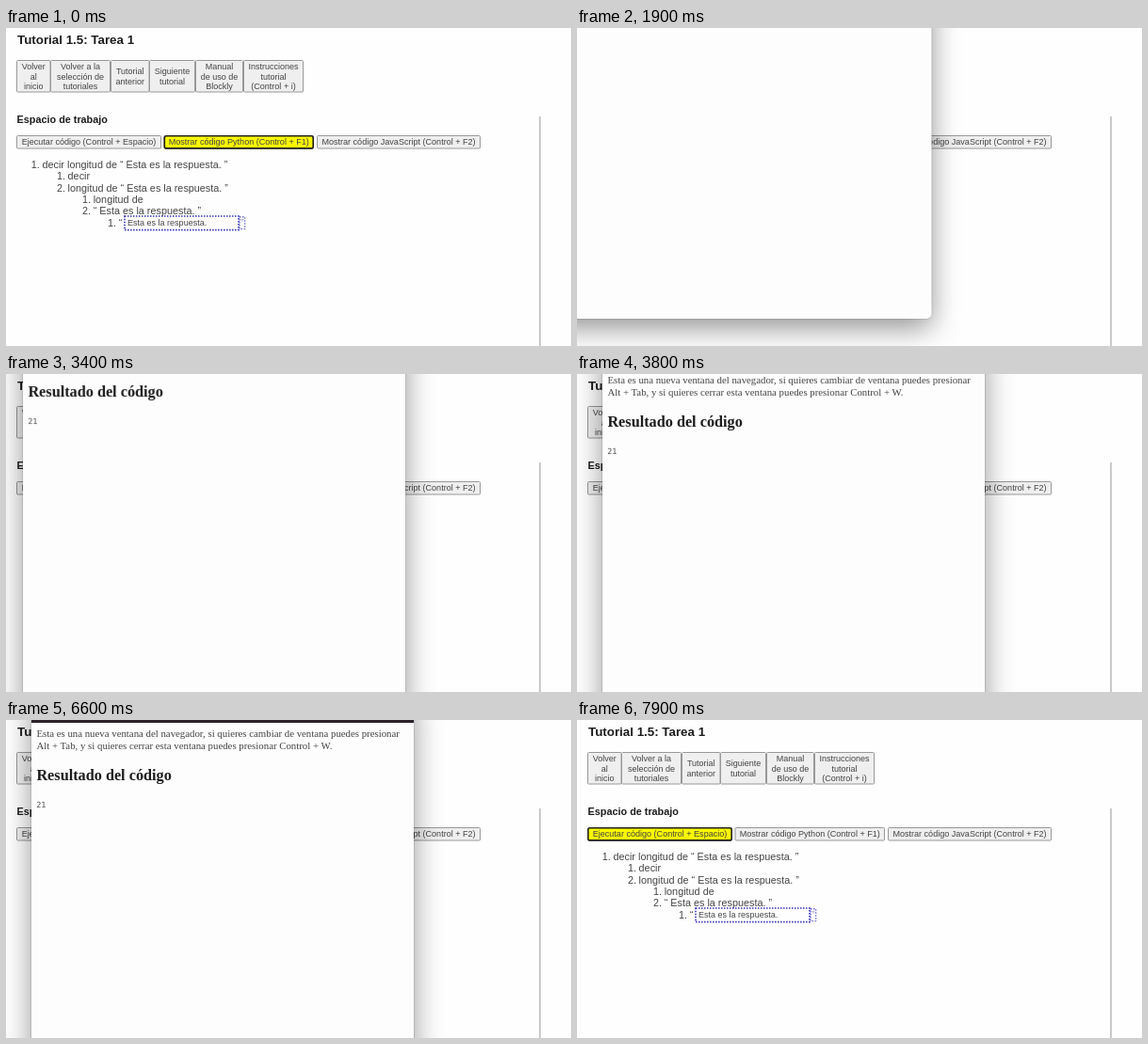
Recreate the animation shown at these times as an HTML page. Size 600 px wide and 338 px high, loop 8000 ms.

```html
<!DOCTYPE html>
<html lang="es">
<head>
<meta charset="utf-8">
<title>Tutorial</title>
<style>
  html, body { margin: 0; width: 100%; height: 100%; overflow: hidden; background: #fefefe; }
  #stage { position: relative; width: 600px; height: 338px; overflow: hidden; background: #fefefe; }
  svg { position: absolute; left: 0; top: 0; overflow: visible; }
  text { white-space: pre; }
  .sans { font-family: "Liberation Sans", Arial, sans-serif; fill: #444; }
  .bold { font-family: "Liberation Sans", Arial, sans-serif; font-weight: bold; fill: #1c1c1c; }
  .serif { font-family: "Liberation Serif", "Times New Roman", serif; fill: #444; }
  .head { font-family: "Liberation Serif", "Times New Roman", serif; font-weight: bold; fill: #1c1c1c; }
  .mono { font-family: "DejaVu Sans Mono", monospace; fill: #505050; }
  #win {
    position: absolute; left: 27px; top: -27px; width: 406px; height: 436px;
    border-radius: 5px; background: #fdfdfe; opacity: 0;
    box-shadow: 0 0 0 .5px rgba(0, 0, 0, .2), 0 10px 30px rgba(0, 0, 0, .42);
  }
  #bar { height: 30px; border-radius: 5px 5px 0 0; background: #2b2229; }
</style>
</head>
<body>
<div id="stage">
  <svg id="page" width="600" height="338"></svg>
  <div id="win"><div id="bar"></div><svg id="doc" width="406" height="436"></svg></div>
</div>
<script>
const LOOP = 8000;
const $ = id => document.getElementById(id);
const page = $('page'), doc = $('doc');

function add(parent, tag, attrs, content) {
  const el = document.createElementNS('http://www.w3.org/2000/svg', tag);
  for (const k in attrs) el.setAttribute(k, attrs[k]);
  if (content) el.textContent = content;
  return parent.appendChild(el);
}
const text = (parent, cls, size, x, y, content, anchor = 'start') =>
  add(parent, 'text', { class: cls, 'font-size': size, x, y, 'text-anchor': anchor }, content);
const box = (x, y, width, height, attrs) =>
  add(page, 'rect', { x, y, width, height, ...attrs });

const plain = { fill: '#efefef', stroke: '#989898', rx: 1 };
const focused = { fill: '#f9f900', stroke: '#222218', 'stroke-width': 1.6, rx: 2 };

text(page, 'bold', 13.35, 12, 17.3, 'Tutorial 1.5: Tarea 1');
text(page, 'bold', 10.83, 11.6, 100.8, 'Espacio de trabajo');

// Navigation: left, right, lines
[
  [11.5, 47, 'Volver|al|inicio'],
  [47.5, 110.5, 'Volver a la|selección de|tutoriales'],
  [111.5, 152, 'Tutorial|anterior'],
  [152.5, 200.5, 'Siguiente|tutorial'],
  [201.5, 251.5, 'Manual|de uso de|Blockly'],
  [252.5, 315.5, 'Instrucciones|tutorial|(Control + i)']
].forEach(([l, r, label]) => {
  box(l, 34.5, r - l, 33.5, plain);
  const lines = label.split('|');
  lines.forEach((s, i) =>
    text(page, 'sans', 9.03, (l + r) / 2, 54.5 + (i - (lines.length - 1) / 2) * 10.2, s, 'middle'));
});

// Actions: left, width, label
const marks = [
  [11.5, 153, 'Ejecutar código (Control + Espacio)'],
  [168, 158.5, 'Mostrar código Python (Control + F1)'],
  [330.5, 173, 'Mostrar código JavaScript (Control + F2)']
].map(([x, w, label]) => {
  box(x, 114.5, w, 13.5, plain);
  const mark = box(x + .3, 114.7, w - .6, 13.2, { ...focused, opacity: 0 });
  text(page, 'sans', 9.05, x + w / 2, 124.4, label, 'middle');
  return mark;
});

// Block outline: depth, number, label
[
  [0, 1, 'decir longitud de “ Esta es la respuesta. ”'],
  [1, 1, 'decir'],
  [1, 2, 'longitud de “ Esta es la respuesta. ”'],
  [2, 1, 'longitud de'],
  [2, 2, '“ Esta es la respuesta. ”'],
  [3, 1, '“']
].forEach(([depth, n, label], row) => {
  const x = 26.8 + depth * 27.1, y = 148.9 + row * 12.35;
  text(page, 'sans', 10.83, x, y, n + '.');
  text(page, 'sans', 10.83, x + 11.7, y, label);
});

const dots = { fill: '#fefefe', stroke: '#3030b8', 'stroke-width': 1.6, 'stroke-dasharray': '1.5 1.5' };
box(248, 200.8, 5.6, 12.8, { ...dots, stroke: '#6c6ccc', 'stroke-width': 1.4 });
text(page, 'sans', 10.83, 249, 210.6, '”').style.fill = '#9a9ad0';
box(126, 200, 121, 14.6, dots);
text(page, 'sans', 9.03, 129, 210.4, 'Esta es la respuesta.');
box(566.4, 94, 1.2, 244, { fill: '#a8a8a8' });

text(doc, 'serif', 10.83, 5.4, 45.4, 'Esta es una nueva ventana del navegador, si quieres cambiar de ventana puedes presionar');
text(doc, 'serif', 10.83, 5.4, 57.8, 'Alt + Tab, y si quieres cerrar esta ventana puedes presionar Control + W.');
text(doc, 'head', 16.25, 5.4, 90.8, 'Resultado del código');
text(doc, 'mono', 8.5, 5.2, 119.8, '21');

const loop = (el, frames) => el.animate(frames, { duration: LOOP, iterations: Infinity });

// Keyboard focus: the page loses it while the window is open
const OPEN = 1500, CLOSE = 7500;
const focus = (el, ...steps) => loop(el, [...steps, [LOOP, 0]].map(([ms, opacity]) =>
  ({ offset: ms / LOOP, opacity, easing: 'step-end' })));
focus(marks[1], [0, 1], [500, 0]);
focus(marks[0], [0, 0], [500, 1], [OPEN, 0], [CLOSE, 1]);

// Window: ms, x, y, scale, opacity
loop($('win'), [
  [0, -56.5, -100, .85, 0],
  [OPEN, -56.5, -100, .85, 0],
  [1700, -56.5, -100, 1, 1],
  [2950, -56.5, -100, 1, 1],
  [3400, -9, -40, 1, 1],
  [3800, 0, -8, 1, 1],
  [4000, 0, 0, 1, 1],
  [CLOSE, 0, 0, 1, 1],
  [7680, 0, 0, .85, 0],
  [LOOP, 0, 0, .85, 0]
].map(([ms, x, y, s, opacity]) => ({
  offset: ms / LOOP, opacity, transform: `translate(${x}px, ${y}px) scale(${s})`
})));
</script>
</body>
</html>
```
